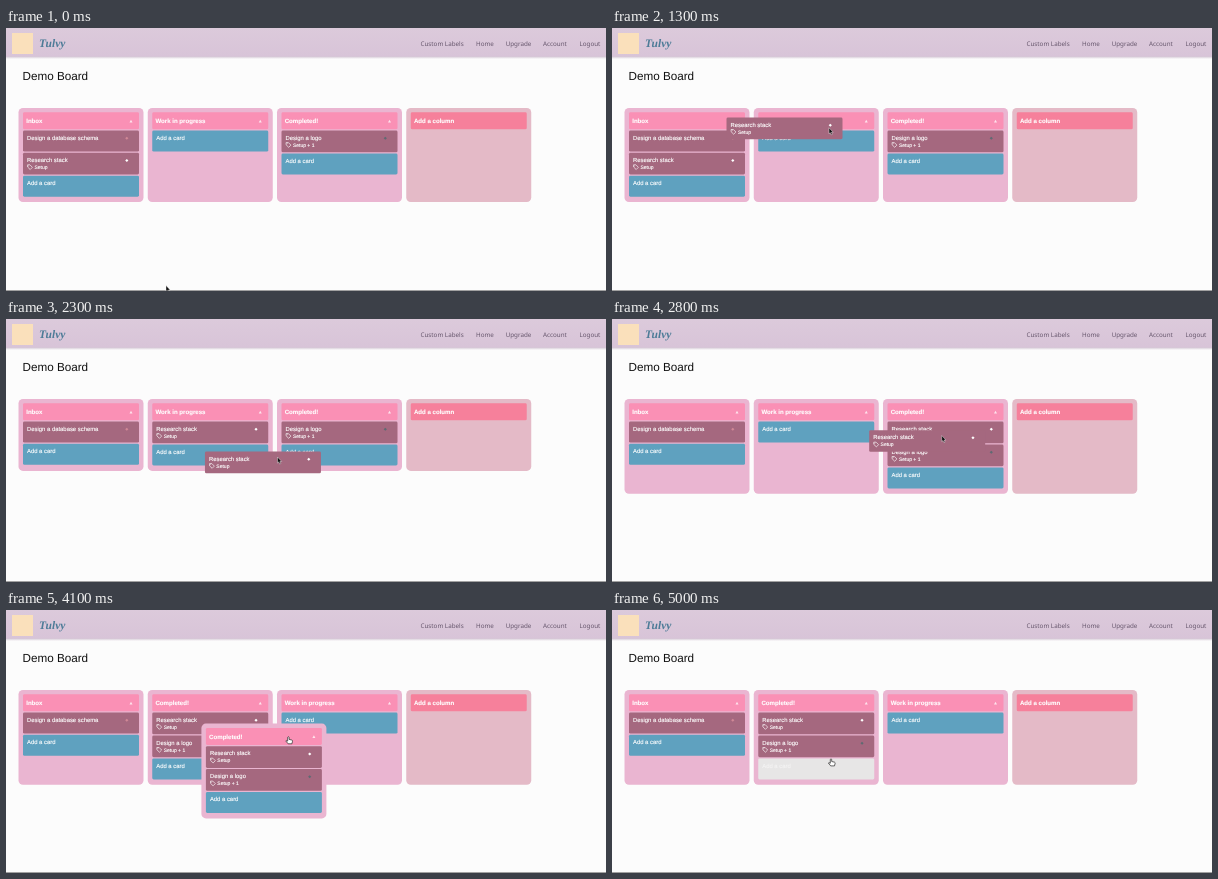
Animation, 600 px wide and 263 px high, one loop 5.4 s. Source, as an HTML page:

```html
<!DOCTYPE html>
<html lang="en">
<head>
<meta charset="utf-8">
<title>Demo Board</title>
<style>
html, body { margin: 0; width: 100%; height: 100%; overflow: hidden; background: #fcfcfc; }
svg { display: block; width: 100vw; height: 100vh; }
text { font-family: "Liberation Sans", Arial, sans-serif; font-size: 5.9px; fill: #fff; text-rendering: geometricPrecision; white-space: pre; }
#board text, #drag text { stroke: #fff; stroke-width: .13px; }
.nav text { font-family: "Noto Sans", sans-serif; font-size: 6.27px; fill: #66566c; }
.brand { font: italic bold 11.5px "Liberation Serif", serif; fill: #4c7b97; }
.title { font-size: 11.7px; fill: #111; }
.head { font-size: 6.1px; font-weight: bold; }
.tag { font-size: 5px; }
</style>
</head>
<body>
<svg viewBox="0 0 600 263">
  <defs>
    <linearGradient id="bar" x1="0" x2="0" y1="0" y2="1">
      <stop offset="0" stop-color="#dccadb"/>
      <stop offset="1" stop-color="#d8c4d8"/>
    </linearGradient>
    <linearGradient id="shade" x1="0" x2="0" y1="0" y2="1">
      <stop offset="0" stop-color="#cdbfce"/>
      <stop offset="1" stop-color="#fcfcfc"/>
    </linearGradient>
  </defs>
  <rect width="600" height="263" fill="#fcfcfc"/>
  <rect y="28" width="600" height="3" fill="url(#shade)"/>
  <rect width="600" height="28.6" fill="url(#bar)"/>
  <rect x="6" y="5" width="21" height="21" fill="#fae0bb"/>
  <text class="brand" x="33" y="18.5">Tulvy</text>
  <g class="nav">
    <text x="414.5" y="18.4">Custom Labels</text>
    <text x="470" y="18.4">Home</text>
    <text x="499.7" y="18.4">Upgrade</text>
    <text x="537" y="18.4">Account</text>
    <text x="573.5" y="18.4">Logout</text>
  </g>
  <text class="title" x="16.5" y="52.4">Demo Board</text>
  <rect y="262.2" width="600" height=".8" fill="#8c8c8c"/>
  <g id="board"></g>
  <g id="drag"></g>
  <g id="cursor"></g>
</svg>
<script>
const LOOP = 5400, STEP = 100;
const TOP = 80, FIRST = 22.6, GAP = 1.2, PAD = 5.4, INSET = 4.5;
const COL_W = 125, CARD_W = COL_W - 2 * INSET;
const slot = i => 12.5 + 129.25 * i;

const cards = {
  schema: { title: 'Design a database schema', fill: '#a5687f', dot: '#d08896' },
  stack: { title: 'Research stack', tag: 'Setup', fill: '#a5687f', dot: '#fff' },
  logo: { title: 'Design a logo', tag: 'Setup + 1', fill: '#a5687f', dot: '#5f6a72' },
  add: { title: 'Add a card', fill: '#5fa1bf' }
};
const cardH = id => cards[id].tag ? 21.7 : 21;
const height = col => col.list.reduce((s, id) => s + cardH(id) + GAP, FIRST - GAP + PAD);

// Key points of the pointer: time, x, y
const path = [
  [0, 160, 257.5], [500, 119.5, 135.1], [700, 175.8, 130.9], [1300, 217, 99.8],
  [2000, 218.8, 108], [2300, 271.5, 138], [3000, 353, 108], [3600, 356, 100.8],
  [3800, 358, 93], [4300, 232, 149], [5000, 219, 148.7]
];

// Each drag rearranges the board at its swap time
const drags = [
  { grab: 500, swap: 1400, drop: 1700, card: 'stack' },
  { grab: 2000, swap: 2600, drop: 3000, card: 'stack' },
  { grab: 3800, swap: 4100, drop: 4500 }
];

function pointer(t) {
  const i = path.findIndex(p => p[0] > t);
  if (i < 0) {
    const [, x, y] = path.at(-1);
    return { x, y };
  }
  const [t0, x0, y0] = path[i - 1], [t1, x1, y1] = path[i];
  const k = (t - t0) / (t1 - t0);
  return { x: x0 + (x1 - x0) * k, y: y0 + (y1 - y0) * k };
}

function layout(t) {
  const swaps = drags.filter(d => t >= d.swap).length;
  const inbox = { name: 'Inbox', list: ['schema', 'add'] };
  const work = { name: 'Work in progress', list: ['add'] };
  const done = { name: 'Completed!', list: ['logo', 'add'] };
  if (swaps === 0) inbox.list.splice(1, 0, 'stack');
  else (swaps === 1 ? work : done).list.unshift('stack');
  return swaps < 3 ? [inbox, work, done] : [inbox, done, work];
}

// Where the dragged item rests when it is picked up
function home(drag) {
  const cols = layout(drag.grab);
  const i = cols.findIndex(c => drag.card ? c.list.includes(drag.card) : c.name === 'Completed!');
  if (!drag.card) return { x: slot(i), y: TOP };
  const list = cols[i].list;
  const above = list.slice(0, list.indexOf(drag.card));
  return { x: slot(i) + INSET, y: TOP + FIRST + above.reduce((s, id) => s + cardH(id) + GAP, 0) };
}

const rect = (x, y, w, h, fill, r) =>
  `<rect x="${x}" y="${y}" width="${w}" height="${h}" rx="${r}" fill="${fill}"/>`;
const label = (x, y, s, cls = '') => `<text class="${cls}" x="${x}" y="${y}">${s}</text>`;
const shape = (x, y, d, attrs) => `<path transform="translate(${x} ${y})" d="${d}" ${attrs}/>`;

function drawCard(id, x, y, hover) {
  const c = cards[id];
  let ink = label(x + 4, y + 9.2, c.title);
  if (c.tag) {
    ink += label(x + 11.4, y + 16.1, c.tag, 'tag') +
      shape(x + 4.2, y + 11.6, 'M.4 .4H2.7L5.2 2.9L3 5.1L.4 2.6Z',
        'fill="none" stroke="#fff" stroke-width=".65" stroke-linejoin="round"') +
      `<circle cx="${x + 5.7}" cy="${y + 13.1}" r=".4" fill="#fff"/>`;
  }
  const dot = c.dot
    ? shape(x + 103.8, y + 7.7, 'M0-1.5L1.6 0L0 1.5L-1.6 0Z', `fill="${hover ? '#b9a5ad' : c.dot}"`)
    : '';
  return rect(x, y, CARD_W, cardH(id), hover ? '#e7e6e6' : c.fill, 1.4) +
    `<g opacity="${hover ? .55 : 1}">${ink}</g>` + dot;
}

const drawFrame = (name, x, y, h, fill, headFill) =>
  rect(x, y, COL_W, h, fill, 4.5) +
  rect(x + INSET, y + 4.3, CARD_W, 17, headFill, 1.4) +
  label(x + 7.7, y + 15, name, 'head');

function drawColumn(col, x, y, h, tip) {
  let s = drawFrame(col.name, x, y, h, '#eab5d1', '#fa90b5') +
    shape(x + 112.5, y + 13, 'M0-1.3L1.5 1.4H-1.5Z', 'fill="#fff" opacity=".75"');
  const cx = x + INSET;
  let cy = y + FIRST;
  for (const id of col.list) {
    const ch = cardH(id), reach = tip && tip.y + 3;
    const hover = tip && tip.x > cx && tip.x < cx + CARD_W && reach > cy && reach < cy + ch;
    s += drawCard(id, cx, cy, hover);
    cy += ch + GAP;
  }
  return s;
}

function drawCursor(p, hand) {
  return hand
    ? shape(p.x, p.y, 'M-.7 .6Q0-.4 .7 .6V2.8L3.6 3.5Q4.3 3.8 4.1 4.7L3.5 7.2H-.3L-2.6 4.3Q-2.4 3.3-.7 4.5Z',
      'fill="#fff" stroke="#333" stroke-width=".75" stroke-linejoin="round"')
    : shape(p.x, p.y, 'M0 0V6L1.3 4.9L2.2 7L3.3 6.5L2.4 4.5H4.2Z',
      'fill="#111" stroke="#fff" stroke-width=".4" stroke-linejoin="round"');
}

const [board, dragLayer, cursor] = ['board', 'drag', 'cursor'].map(id => document.getElementById(id));

function draw(t) {
  const p = pointer(t), cols = layout(t);
  const drag = drags.find(d => t >= d.grab && t < d.drop);
  const h = Math.max(...cols.map(height));
  board.innerHTML = cols.map((c, i) => drawColumn(c, slot(i), TOP, h, !drag && p)).join('') +
    drawFrame('Add a column', slot(3), TOP, h, '#e4bac7', '#f6809b');

  let held = '';
  if (drag) {
    const from = pointer(drag.grab), rest = home(drag);
    const x = rest.x + p.x - from.x, y = rest.y + p.y - from.y;
    held = drag.card
      ? drawCard(drag.card, x, y)
      : drawColumn(cols.find(c => c.name === 'Completed!'), x, y, h);
  }
  dragLayer.innerHTML = held;

  const overBoard = p.y > TOP && p.y < TOP + h;
  cursor.innerHTML = drawCursor(p, drag ? !drag.card : overBoard);
}

let last = -1;
function tick() {
  const t = Math.floor(performance.now() % LOOP / STEP) * STEP;
  if (t !== last) draw(last = t);
  requestAnimationFrame(tick);
}
tick();
</script>
</body>
</html>
```
